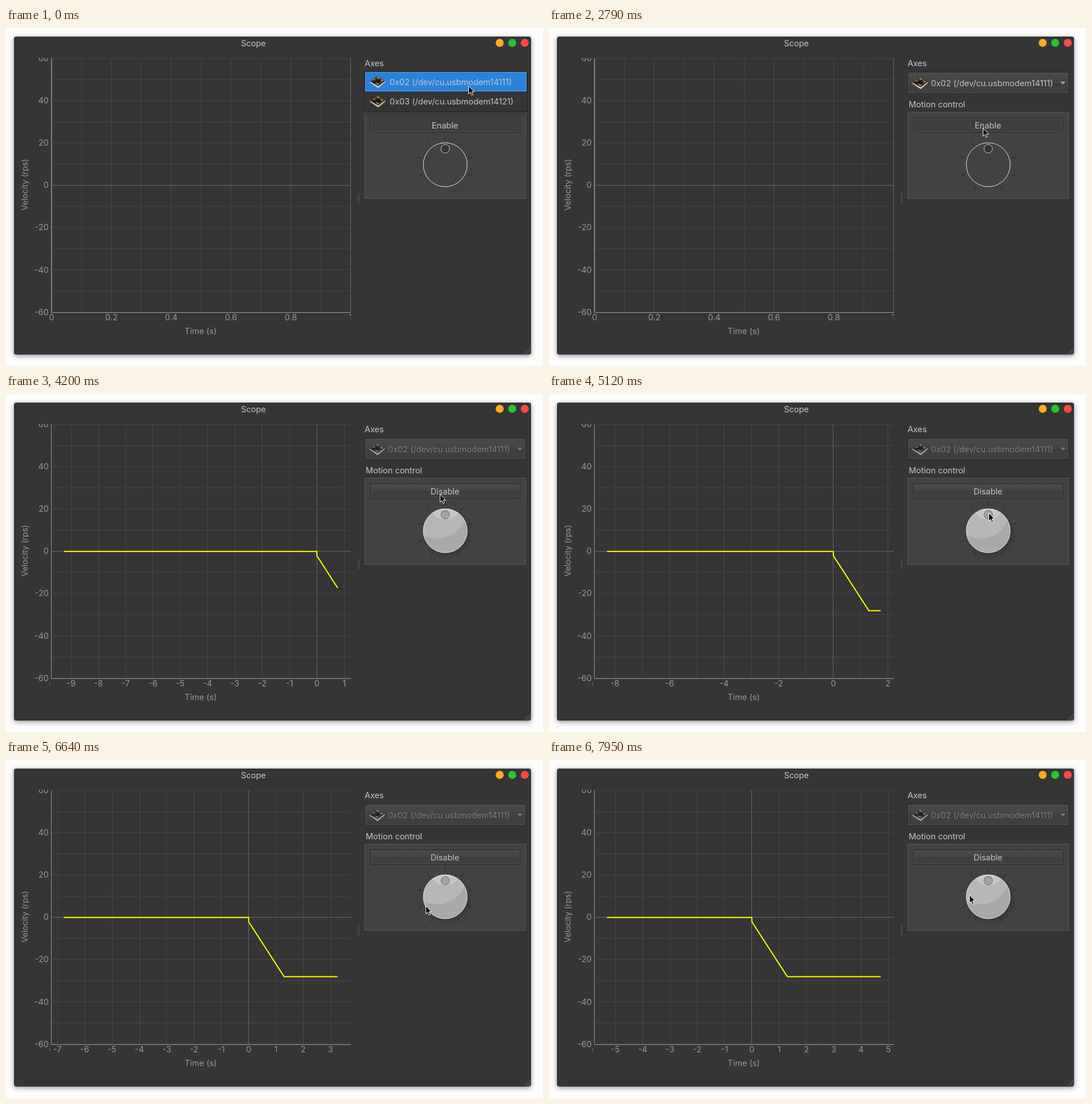
Write an HTML page that moves like this. It is 942x592 px and loops after 8 s.

```html
<!DOCTYPE html>
<html lang="en">
<head>
<meta charset="utf-8">
<title>Scope</title>
<style>
  html, body { margin: 0; width: 100%; height: 100%; overflow: hidden; background: #fdfdfd; }
  svg { display: block; width: 942px; height: 592px; font: 14.5px Inter, Roboto, sans-serif; fill: #c6c6c6; }
  .window { fill: #353535; filter: drop-shadow(0 2px 4px rgba(0, 0, 0, .45)); }
  .mid { text-anchor: middle; }
  .axis { fill: #999; }
  .line { fill: none; stroke-width: 1; }
  .dots { fill: none; stroke: #8a8a8a; stroke-width: 1; }
  .off .combo-text { fill: #7d7d7d; }
  .off .combo-icon { filter: grayscale(1); opacity: .75; }
  .off .combo-arrow { fill: #777; }
</style>
</head>
<body>
<svg viewBox="0 0 942 592">
  <defs>
    <linearGradient id="gloss" x2="0" y2="1">
      <stop offset="0" stop-color="#4b4b4b"/>
      <stop offset=".5" stop-color="#434343"/>
      <stop offset=".52" stop-color="#3e3e3e"/>
      <stop offset="1" stop-color="#404040"/>
    </linearGradient>
    <radialGradient id="shade">
      <stop offset=".7" stop-color="#222" stop-opacity=".4"/>
      <stop offset="1" stop-color="#222" stop-opacity="0"/>
    </radialGradient>
    <clipPath id="knobClip"><circle cx="770.5" cy="239.5" r="38.5"/></clipPath>
    <clipPath id="plotClip"><rect x="80" y="53" width="525" height="446"/></clipPath>
    <clipPath id="xClip"><rect id="xClipBox" x="75" y="499" width="530" height="18"/></clipPath>
    <clipPath id="yClip"><rect x="40" y="52.5" width="39" height="460"/></clipPath>
    <g id="board">
      <path fill="#d8d4cc" d="M0 12 13 2l15 9-13 11z"/>
      <path fill="#43361f" d="M1 11 13 1l14 9-12 9z"/>
      <path fill="#17181a" d="m9 10 5-4 6 4-5 4zM4 11l3-2 4 3-3 2z"/>
      <path fill="#b08c4c" d="m12 4 2-2 4 3-2 1zM19 8l2-1 3 2-2 2zM11 14l2-1 3 2-1 2z"/>
      <path fill="#8d8a86" d="m6 8 2-2 2 1-2 2z"/>
    </g>
  </defs>

  <rect class="window" x="14" y="15" width="907" height="557" rx="4"/>
  <text class="mid" x="434" y="32">Scope</text>
  <circle cx="866" cy="26" r="7" fill="#ffab24"/>
  <circle cx="888" cy="26" r="7" fill="#26c52e"/>
  <circle cx="910" cy="26" r="7" fill="#ff4747"/>

  <g clip-path="url(#plotClip)">
    <path id="minor" class="line" stroke="#454545"/>
    <path id="major" class="line" stroke="#4b4b4b"/>
    <path id="top" class="line" stroke="#686868"/>
    <path id="trace" class="line" stroke="#ff0" style="stroke-width:2"/>
  </g>
  <path class="line" stroke="#969696" d="M79.5 53V498.5H605"/>
  <g id="yLabels" class="axis" text-anchor="end" clip-path="url(#yClip)"></g>
  <g id="xLabels" class="axis mid" clip-path="url(#xClip)"></g>
  <path id="speck" class="line" stroke="#68707c" d="M76.5 504v6"/>
  <text class="axis mid" x="341.5" y="536">Time (s)</text>
  <text class="axis mid" transform="translate(38 274.5) rotate(-90)" style="font-size:14.3px">Velocity (rps)</text>

  <path class="dots" d="M617.5 290v16M619.5 290v16" stroke-dasharray="1 1.5" stroke-opacity=".8"/>
  <path class="dots" d="M909 571l11-11M912 571l8-8M915 571l5-5M918 571l2-2" stroke-dasharray="1.5 1.5"/>

  <text x="629" y="67">Axes</text>
  <g id="combo">
    <rect x="629.5" y="77.5" width="282" height="37" rx="2" fill="url(#gloss)" stroke="#222"/>
    <rect class="line" x="630.5" y="78.5" width="280" height="35" rx="1.5" stroke="#555"/>
    <use class="combo-icon" href="#board" x="637" y="85"/>
    <text class="combo-text" x="670" y="102">0x02 (/dev/cu.usbmodem14111)</text>
    <path class="combo-arrow" fill="#a5a5a5" d="M897 94h9l-4.5 5z"/>
  </g>

  <text x="631" y="139">Motion control</text>
  <rect x="629.5" y="147.5" width="282" height="151" fill="#424242" stroke="#595959"/>
  <rect x="639.5" y="157.5" width="262" height="25" rx="2" fill="#3e3e3e" stroke="#222"/>
  <rect id="face" x="640.5" y="158.5" width="260" height="23" rx="1.5" stroke="#555"/>
  <text id="action" class="mid" x="770" y="176"></text>

  <path id="notches" class="line" stroke="#222"/>
  <g id="knob">
    <circle cx="774" cy="244" r="45" fill="url(#shade)"/>
    <g clip-path="url(#knobClip)">
      <rect x="730" y="200" width="82" height="80" fill="#a9a9a9"/>
      <circle cx="757" cy="202" r="51" fill="#b7b7b7"/>
      <ellipse cx="770.5" cy="205" rx="22" ry="15" fill="#c6c6c6"/>
    </g>
  </g>
  <circle class="line" cx="770.5" cy="239.5" r="38.5" stroke="#e6e6e6"/>
  <circle id="dimple" cx="770.5" cy="211.5" r="7.5"/>

  <g id="popup">
    <rect x="630" y="147" width="281" height="8" fill="#3a3a3a"/>
    <rect x="628.5" y="76.5" width="286" height="70" fill="#353535" stroke="#232323"/>
    <rect id="pick" x="630.5" y="77.5" width="282" height="33" fill="#2a82da" stroke="#58a0e4"/>
    <use href="#board" x="638" y="83"/>
    <text x="673" y="100">0x02 (/dev/cu.usbmodem14111)</text>
    <use href="#board" x="638" y="117"/>
    <text x="673" y="134">0x03 (/dev/cu.usbmodem14121)</text>
  </g>

  <path id="cursor" fill="#000" stroke="#fff" stroke-linejoin="round"
        d="M.5.5v14l3.2-3 2.2 5.2 2.3-1-2.2-5h4.3z"/>
</svg>

<script>
const LOOP = 8000, CLOSE = 1770, PRESS = 2790, ENABLE = 3450;
const SCALE = 47.9, HEAD = 581.8, ZERO_Y = 275.5, UNIT_Y = 3.705;

// bursts of picture updates: start, end, count
const bursts = [
  [360, 750, 7], [1050, 1410, 6], [1770, 2550, 13], [2790, 2790, 1],
  [3450, 4200, 14], [4260, 5060, 14], [5120, 5900, 14],
  [5960, 6760, 15], [6810, 7560, 14], [7620, 7950, 7]
];
// cursor tip: time, x, y
const path = [
  [0, 811, 101], [300, 811, 101], [750, 808, 127], [1000, 808, 127], [1410, 812, 99],
  [1770, 812, 99], [2550, 761, 175], [4300, 761, 175], [5060, 771, 208], [5200, 771, 208],
  [5900, 736, 253], [6400, 736, 253], [7000, 737, 261], [7400, 737, 261], [7950, 737, 236]
];
// play time to scope seconds
const clock = [[3450, 0], [4200, .762], [5120, 1.733], [5960, 2.6], [7330, 4.04], [7950, 4.717]];

const $ = id => document.getElementById(id);
const show = (id, on) => { $(id).style.display = on ? '' : 'none'; };
const crisp = v => Math.floor(v) + .5;
const label = (x, y, s) => `<text x="${x}" y="${y}">${s}</text>`;
const smooth = p => p * p * (3 - 2 * p);

function sample(keys, t, ease = p => p) {
  let i = 1;
  while (i < keys.length - 1 && keys[i][0] < t) i++;
  const a = keys[i - 1], b = keys[i];
  const p = ease(Math.min(1, Math.max(0, (t - a[0]) / (b[0] - a[0]))));
  return a.slice(1).map((v, k) => v + (b[k + 1] - v) * p);
}

function snap(t) {
  let last = 0;
  for (const [from, to, n] of bursts) {
    if (t < from) break;
    const step = n > 1 ? (to - from) / (n - 1) : 1;
    last = from + Math.min(n - 1, Math.floor((t - from) / step + .01)) * step;
  }
  return last;
}

const rows = { minor: '', top: '' };
let yText = '';
for (let v = -60; v <= 60; v += 10) {
  const y = ZERO_Y - v * UNIT_Y;
  rows[v ? 'minor' : 'top'] += `M80 ${crisp(y)}H605`;
  if (v % 20 === 0) yText += label(75, Math.round(y + 4.8), v);
}
$('yLabels').innerHTML = yText;

let notches = '';
for (let k = -4; k <= 4; k++) {
  const a = k * 37.5 * Math.PI / 180, s = Math.sin(a), c = Math.cos(a);
  notches += `M${770.5 + 43.5 * s} ${239.5 - 43.5 * c}L${770.5 + 50.5 * s} ${239.5 - 50.5 * c}`;
}
$('notches').setAttribute('d', notches);

// ticks every unit; even ones are major, every tenth is on top
function drawAxis(zero, gap, unit) {
  const lo = Math.ceil((79.5 - zero) / gap), hi = Math.floor((605 - zero) / gap);
  const d = { minor: rows.minor, major: '', top: rows.top };
  const evens = Math.floor(hi / 2) - Math.ceil(lo / 2) + 1;
  let text = '';
  for (let k = lo; k <= hi; k++) {
    const x = zero + k * gap;
    d[k % 10 === 0 ? 'top' : k % 2 === 0 ? 'major' : 'minor'] += `M${crisp(x)} 53V498`;
    if (k % 2 === 0 || evens < 6) text += label(x.toFixed(1), 512, +(k * unit).toFixed(1));
  }
  for (const id in d) $(id).setAttribute('d', d[id]);
  $('xLabels').innerHTML = text;
}

function drawTrace(zero, now) {
  const at = s => `${(zero + s * SCALE).toFixed(2)} ${(ZERO_Y + .3 + Math.min(28, 2 + 20 * s) * UNIT_Y).toFixed(2)}`;
  let d = `M101.5 ${ZERO_Y + .3}H${Math.min(zero, HEAD)}`;
  if (now > 0) {
    d += `L${at(0)}L${at(Math.min(now, 1.3))}`;
    if (now > 1.3) d += `L${at(now)}`;
  }
  $('trace').setAttribute('d', d);
}

let shown = -1;
function render(time) {
  const t = snap(time);
  if (t === shown) return;
  shown = t;
  const on = t >= ENABLE;
  const [x, y] = sample(path, t, smooth).map(Math.round);
  $('cursor').setAttribute('transform', `translate(${x} ${y})`);

  show('popup', t < CLOSE);
  $('pick').setAttribute('y', y < 111 ? 77.5 : 111.5);
  $('combo').setAttribute('class', on ? 'off' : '');

  const hover = t >= CLOSE && t < PRESS && y > 157;
  $('face').setAttribute('fill', on || hover ? 'url(#gloss)' : '#3e3e3e');
  $('action').textContent = on ? 'Disable' : 'Enable';

  show('knob', on);
  $('dimple').setAttribute('fill', on ? '#a2a2a2' : '#353535');
  $('dimple').setAttribute('stroke', on ? '#6a6a6a' : '#cfcfcf');

  show('trace', on);
  show('speck', on);
  $('xClipBox').setAttribute('x', on ? 77 : 75);
  $('xClipBox').setAttribute('width', on ? 528 : 530);
  if (on) {
    const [now] = sample(clock, t);
    const zero = HEAD - now * SCALE;
    drawAxis(zero, SCALE, 1);
    drawTrace(zero, now);
  } else {
    drawAxis(80, 52.45, .1);
  }
}

const start = performance.now();
function tick() {
  render((performance.now() - start) % LOOP);
  requestAnimationFrame(tick);
}
tick();
</script>
</body>
</html>
```
